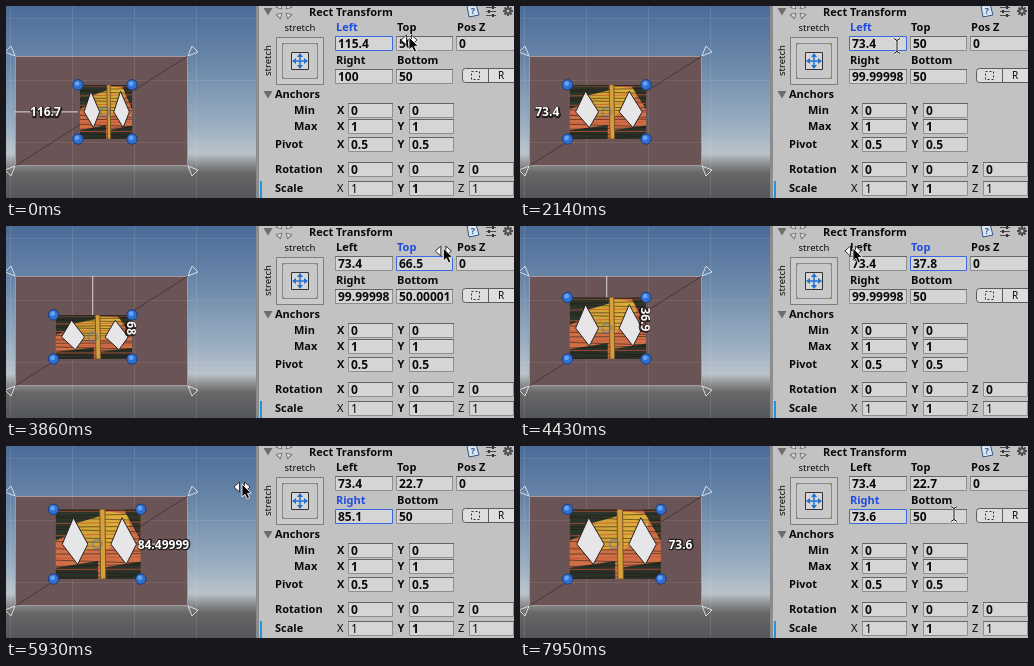
An HTML page with a canvas for the animation above (8000 ms loop, 508x192 px).

```html
<!DOCTYPE html>
<html lang="en">
<head>
<meta charset="utf-8">
<title>Rect Transform</title>
<style>
  html, body { margin: 0; width: 100%; height: 100%; overflow: hidden; }
  canvas { display: block; }
</style>
</head>
<body>
<canvas id="stage" width="508" height="192"></canvas>
<script>
const g = document.getElementById('stage').getContext('2d');
const LOOP = 8000, SCENE_LAG = 60, UNIT = 0.565, DRAG_SPEED = 3.64;
const PANEL = { left: 9, top: 50, right: 182, bottom: 160 };
const FONT = '"Noto Sans", "Open Sans", sans-serif';
const INK = '#0a0a0a', BLUE = '#1f4ce0', GREY = '#c2c2c2';

// Turning points of each dragged value: time, value
const DRAGS = {
  Left: [[-85, 116.8], [1000, 26], [1740, 73.4]],
  Top: [[2830, 50], [3200, 26.3], [3800, 68], [4250, 34.2], [4430, 37.8], [4600, 22.7]],
  Right: [[5150, 100], [5700, 81.3], [5930, 85.1], [6300, 95.6], [6900, 76], [7100, 76], [7250, 73.6]],
};
// Stops of the pointer: time, x, y
const STOPS = [[1740, 250, 36], [1920, 250, 36], [2140, 377, 40], [2450, 424, 36], [2720, 377, 22],
  [4840, 278, 22], [5150, 340, 54], [5700, 220, 45], [5930, 236, 38], [6300, 320, 60],
  [6680, 273, 65], [7250, 240, 66], [7900, 434, 68]];

// Eased position between the neighbouring keys
function at(keys, t, axis = 1) {
  const i = keys.findIndex(k => k[0] > t);
  if (i < 0) return keys[keys.length - 1][axis];
  if (i === 0) return keys[0][axis];
  const a = keys[i - 1], b = keys[i];
  const p = (t - a[0]) / (b[0] - a[0]);
  return a[axis] + (b[axis] - a[axis]) * (1 - Math.cos(Math.PI * p)) / 2;
}

const valueOf = (name, t) => at(DRAGS[name], t);
const activeField = t => t < 2900 ? 'Left' : t < 5150 ? 'Top' : 'Right';
const isDragging = t => Object.values(DRAGS).some(keys => t >= keys[0][0] && t < keys[keys.length - 1][0] + 100);
const plain = v => String(+v.toFixed(1));

// Float rounding noise on some values
function noisy(v) {
  const n = Math.round(v * 10);
  return n % 9 === 8 ? (n / 10 + (n % 2 ? -1e-5 : 1e-5)).toFixed(5) : plain(v);
}

function rect(x, y, w, h, fill, stroke) {
  if (fill) { g.fillStyle = fill; g.fillRect(x, y, w, h); }
  if (stroke) { g.lineWidth = 1; g.strokeStyle = stroke; g.strokeRect(x + 0.5, y + 0.5, w - 1, h - 1); }
}

function paint(fill, stroke, width) {
  if (fill) { g.fillStyle = fill; g.fill(); }
  if (stroke) { g.lineWidth = width; g.strokeStyle = stroke; g.stroke(); }
}

function poly(points, fill, stroke, width = 1) {
  g.beginPath();
  points.forEach(([x, y]) => g.lineTo(x, y));
  g.closePath();
  paint(fill, stroke, width);
}

function circle(x, y, r, fill, stroke, width = 1) {
  g.beginPath();
  g.arc(x, y, r, 0, 7);
  paint(fill, stroke, width);
}

function line(x1, y1, x2, y2, color, width = 1) {
  g.beginPath();
  g.moveTo(x1, y1);
  g.lineTo(x2, y2);
  paint(null, color, width);
}

function turned(x, y, angle, draw) {
  g.save();
  g.translate(x, y);
  g.rotate(angle);
  draw();
  g.restore();
}

function fourWays(x, y, offset, draw) {
  for (let i = 0; i < 4; i++) turned(x, y, offset + i * Math.PI / 2, draw);
}

// y is the middle of the capitals
function text(s, x, y, { size = 11, weight = 700, color = INK, align = 'left' } = {}) {
  g.font = `${weight} ${size}px ${FONT}`;
  g.textAlign = align;
  g.fillStyle = color;
  g.fillText(s, x, y + size * 0.36);
}

function sceneLabel(s, x, y) {
  g.font = `700 12px ${FONT}`;
  g.textAlign = 'center';
  g.lineJoin = 'round';
  g.lineWidth = 2.5;
  g.strokeStyle = 'rgba(20,16,18,.8)';
  g.strokeText(s, x + 0.5, y + 5);
  g.fillStyle = '#fff';
  g.fillText(s, x, y + 4.5);
}

function drawPicture(x, y, w, h) {
  const shape = (pts, fill, stroke) => poly(pts.map(([u, v]) => [x + u * w, y + v * h]), fill, stroke);
  g.save();
  g.beginPath();
  g.rect(x, y, w, h);
  g.clip();
  rect(x, y, w, h, '#cf6f48');
  shape([[0, 0], [0.52, 0], [0.52, 0.15], [0, 0.45]], '#2b3529');
  shape([[0.24, 0.2], [0.52, 0.1], [0.52, 0.55], [0.3, 0.6]], '#d3a437');
  shape([[0.58, 0.02], [0.88, 0.08], [0.84, 0.4], [0.58, 0.58]], '#dcae39');
  shape([[0.8, 0], [1, 0], [1, 0.45]], '#2f3328');
  for (const u of [0, 0.55]) shape([[u, 0.84], [u + 0.5, 0.74], [u + 0.5, 1], [u, 1]], '#2a3128');
  const rows = 18;
  for (let i = 0; i < rows; i++) {
    const v = (i + 0.5) / rows, tilt = 0.02 * Math.sin(i * 2.3);
    line(x, y + (v + tilt) * h, x + w, y + (v - tilt) * h, i % 3 ? 'rgba(35,22,16,.55)' : 'rgba(200,82,52,.7)');
  }
  rect(x, y, w, 1.5, '#2f2c22');
  shape([[0.52, 0], [0.58, 0], [0.59, 1], [0.53, 1]], '#d6a03a', '#7a5426');
  for (const u of [0.23, 0.8])
    shape([[u - 0.02, 0.12], [u + 0.15, 0.5], [u + 0.03, 0.79], [u - 0.15, 0.5]], '#e6e5e8', '#2a211f');
  g.restore();
}

function drawScene(t) {
  const { left, top, right, bottom } = PANEL;
  const field = activeField(t), seen = t - SCENE_LAG;
  const L = valueOf('Left', seen), T = valueOf('Top', seen), R = valueOf('Right', seen);
  const x1 = left - 3 + L * UNIT, x2 = right + 0.5 - R * UNIT;
  const y1 = top + 0.5 + T * UNIT, y2 = bottom - 27;
  const midX = (x1 + x2) / 2, midY = (y1 + y2) / 2;

  const sky = g.createLinearGradient(0, 0, 0, 192);
  [[0, '#4b6b98'], [0.3, '#6b88aa'], [0.62, '#9aaec1'], [0.77, '#b9c3cb'], [0.82, '#8f9193'], [0.87, '#696666'], [1, '#53565c']]
    .forEach(([p, c]) => sky.addColorStop(p, c));
  rect(0, 0, 251, 192, sky);
  rect(left, top, right - left, bottom - top, '#6b5456', 'rgba(200,200,205,.6)');
  for (let i = 0; i < 4; i++) {
    const p = 4.5 + i * 62;
    line(p, 0, p, 192, 'rgba(255,255,255,.1)');
    line(0, p + 8, 251, p + 8, 'rgba(255,255,255,.08)');
  }
  line(left, bottom, right, top, 'rgba(35,25,28,.5)');

  for (const [x, sx] of [[left, -1], [right, 1]])
    for (const [y, sy] of [[top, -1], [bottom, 1]])
      poly([[x, y], [x + sx * 10, y + sy * 4], [x + sx * 4, y + sy * 10]], null, 'rgba(240,244,248,.8)');

  drawPicture(x1 + 2, y1, x2 - x1 - 2, y2 - y1);
  circle(midX, midY, 4.5, null, 'rgba(90,120,165,.55)', 2);

  if (isDragging(t)) {
    const guide = 'rgba(240,240,240,.85)';
    if (field === 'Left') line(left, midY, x1, midY, guide);
    if (field === 'Right') line(x2, midY, right, midY, guide);
    if (field === 'Top') line(midX, top, midX, y1, guide);
  }

  for (const x of [x1, x2])
    for (const y of [y1, y2]) {
      circle(x, y, 5.2, '#2f70d2', '#173d7c');
      circle(x - 0.8, y - 1.2, 2.4, '#68a2ee');
    }

  if (field === 'Left') sceneLabel(plain(L), (left + x1) / 2 - 1, midY);
  if (field === 'Right') sceneLabel(noisy(R), (right + x2) / 2 - 1, midY);
  if (field === 'Top') turned(125, 83 + T * UNIT / 2, Math.PI / 2, () => sceneLabel(plain(T), 0, 0));
}

function inputBox(value, x, y, w, active, weight = 600) {
  rect(x, y - 7, w, 15, '#d5d5d5', active ? '#3c68e0' : '#8e8e8e');
  if (!active) line(x, y - 6.5, x + w, y - 6.5, '#656565');
  g.save();
  g.beginPath();
  g.rect(x + 1, y - 7, w - 2, 15);
  g.clip();
  text(value, x + 3, y + 0.5, { size: 12, weight });
  g.restore();
}

function labelled(name, value, x, y, w, active) {
  text(name, x + 1, y - 15.5, { color: active ? BLUE : INK });
  inputBox(value, x, y, w, active);
}

function foldout(x, y) {
  poly([[x - 4.5, y - 3], [x + 4.5, y - 3], [x, y + 4.5]], '#6d6d6d');
}

function drawAnchorPreset() {
  const cx = 294, cy = 54.5, small = { size: 9.5, weight: 400, align: 'center' };
  text('stretch', cx, 22, small);
  turned(262, cy, -Math.PI / 2, () => text('stretch', 0, 0, small));
  const square = (half, fill, stroke) => rect(cx - half, cy - half + 0.5, half * 2, half * 2, fill, stroke);
  square(24, '#cacaca', '#7c7c7c');
  square(18, '#c8c8c8', '#8a8a8a');
  square(9, '#d6d6d6', '#333');
  for (const dx of [-18, 16])
    for (const dy of [-17, 17]) rect(cx + dx, cy + dy - 0.5, 2, 2, '#a98256');
  fourWays(cx, cy + 0.5, 0, () => {
    line(0, 0, 6, 0, '#2272cf', 1.5);
    poly([[8, 0], [4, -3], [4, 3]], '#2272cf');
  });
}

function drawHeader() {
  foldout(262, 5);
  fourWays(278, 5, Math.PI / 4, () => poly([[3, 0], [8, -3], [8, 3]], '#dedede', '#777'));
  text('Rect Transform', 303, 6);
  poly([[461, 0], [470, -2], [473, 9], [463, 11]], '#dbe5f0', '#35577f');
  text('?', 467, 4.5, { size: 9, color: '#2c5a9c', align: 'center' });
  for (let i = 0; i < 3; i++) {
    const y = 1.5 + i * 4;
    line(480, y, 490, y, '#4d4d4d');
    rect(486 - (i % 2) * 4, y - 1.5, 2, 3, '#333');
  }
  fourWays(502, 5, 0, () => { line(0, 0, 5, 0, '#4d4d4d', 2); line(0, 0, 3.5, 3.5, '#4d4d4d', 2); });
  circle(502, 5, 2.5, GREY, '#4d4d4d', 2);
}

function drawButtons() {
  g.beginPath();
  g.roundRect(456.5, 62.5, 60, 14, 3);
  paint('#dedede', '#5c5c5c', 1);
  line(482.5, 63, 482.5, 76, '#5c5c5c');
  g.setLineDash([2, 2]);
  rect(465, 65, 9, 9, null, '#333');
  g.setLineDash([]);
  text('R', 495, 69.5, { size: 10, weight: 400, align: 'center' });
}

function vectorRow(name, x, y, values, weights = []) {
  text(name, x, y);
  values.forEach((v, i) => {
    const axisX = 331 + i * 60.5;
    text('XYZ'[i], axisX, y, { weight: weights[i] || 700 });
    inputBox(v, Math.round(axisX + 11), y, 45, false, weights[i]);
  });
}

function drawInspector(t) {
  const field = activeField(t);
  rect(250, 0, 258, 192, GREY);
  rect(250, 0, 3, 192, '#8c8c8c');
  rect(254, 175, 2, 17, '#2393dc');
  drawHeader();
  drawAnchorPreset();

  const rightValue = t < 200 ? '100' : t < 5150 ? '99.99998' : noisy(valueOf('Right', t));
  const bottomValue = t > 2900 && t < 4200 ? '50.00001' : '50';
  labelled('Left', plain(valueOf('Left', t)), 329, 37, 58, field === 'Left');
  labelled('Top', plain(valueOf('Top', t)), 390, 37, 57, field === 'Top');
  labelled('Pos Z', '0', 450, 37, 60, false);
  labelled('Right', rightValue, 329, 70, 58, field === 'Right');
  labelled('Bottom', bottomValue, 390, 70, 57, false);
  drawButtons();

  foldout(262, 88);
  text('Anchors', 269, 88);
  vectorRow('Min', 288, 104, ['0', '0']);
  vectorRow('Max', 288, 120, ['1', '1']);
  vectorRow('Pivot', 269, 138, ['0.5', '0.5']);
  vectorRow('Rotation', 269, 163, ['0', '0', '0']);
  vectorRow('Scale', 269, 182, ['1', '1', '1'], [400, 700, 400]);
}

// Left and Top drags tie the pointer to the value
function pointerAt(t) {
  if (t < 1740) return [403 + (valueOf('Left', t) - 115.4) * DRAG_SPEED, 31 + t / 350];
  if (t > 2720 && t < 4840) return [326 + (valueOf('Top', t) - 35.9) * DRAG_SPEED, 22];
  return [at(STOPS, t), at(STOPS, t, 2)];
}

function drawPointer(t) {
  const [x, y] = pointerAt(t);
  g.save();
  g.translate(x, y);
  if ((t > 2050 && t < 2600) || t > 7550) {
    for (const [color, w] of [['rgba(255,255,255,.7)', 2.5], ['#111', 1]]) {
      line(0, -6, 0, 6, color, w);
      for (const sx of [-3, 3])
        for (const sy of [-1, 1]) line(0, sy * 5.5, sx, sy * 7.5, color, w);
    }
  } else {
    if (isDragging(t))
      for (const s of [-1, 1]) poly([[s * 8, 3], [s * 2.5, -2], [s * 2.5, 8]], '#fff', '#333');
    poly([[0, 0], [0, 13], [3, 10.3], [5.2, 15], [7.6, 14], [5.5, 9.4], [9.3, 9.2]], INK, '#f5f5f5', 0.9);
  }
  g.restore();
}

const start = performance.now();
function frame() {
  const t = (performance.now() - start) % LOOP;
  drawScene(t);
  drawInspector(t);
  drawPointer(t);
  requestAnimationFrame(frame);
}
frame();
</script>
</body>
</html>
```
